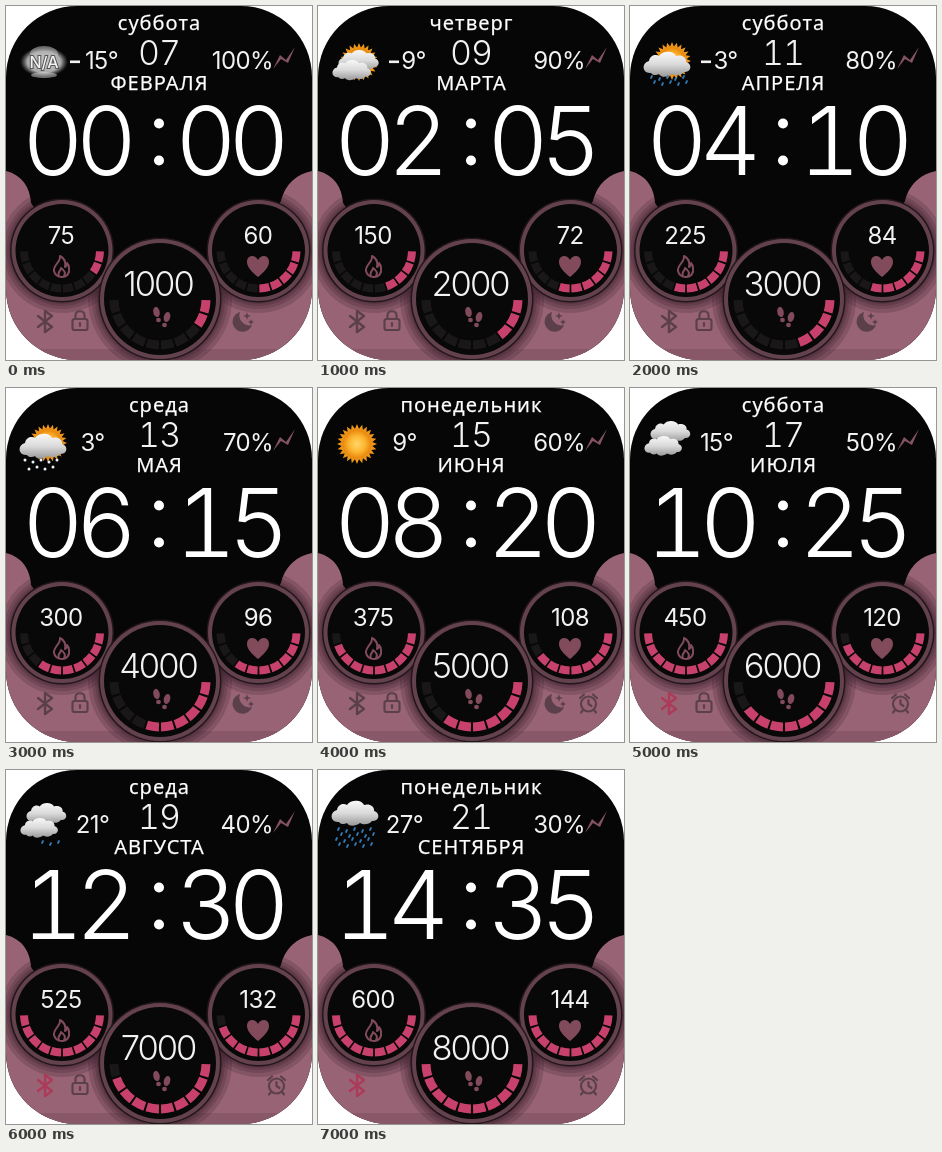
An HTML page that plays this animation: 306 px wide and 354 px high, repeating every 8000 ms.

```html
<!DOCTYPE html>
<html lang="ru">
<head>
<meta charset="utf-8">
<title>Watch face</title>
<style>
html, body { margin: 0; width: 100%; height: 100%; overflow: hidden; background: #fff; }
svg { display: block; width: 306px; height: 354px; }
text { fill: #f2f2f2; font-family: Inter, sans-serif; text-anchor: middle; }
.word { font: 20px "Noto Sans", sans-serif; letter-spacing: 1px; fill: #fff; stroke: #fff; stroke-width: .25; }
.time { font-size: 95.5px; font-weight: 300; fill: #fff; font-variant-numeric: tabular-nums; }
.date { font-size: 34px; font-weight: 300; font-variant-numeric: tabular-nums; letter-spacing: -1px; }
.big { font-size: 34.5px; font-weight: 300; letter-spacing: -2px; }
.mid { font-size: 24px; font-weight: 400; letter-spacing: -.6px; }
.line { fill: none; stroke-linecap: round; stroke-linejoin: round; }
</style>
</head>
<body>
<svg viewBox="0 0 306 354">
  <defs>
    <clipPath id="face"><rect width="306" height="354" rx="71"/></clipPath>
    <clipPath id="floor"><path d="M0 165C16 169 24 181 25 197L56 244L154 293L252 244L275 195C279 178 291 168 306 165V354H0Z"/></clipPath>
    <radialGradient id="sunFill">
      <stop offset="0" stop-color="#ffd768"/><stop offset=".55" stop-color="#fdb632"/><stop offset="1" stop-color="#e8860c"/>
    </radialGradient>
    <linearGradient id="cloudFill" x2="0" y2="1">
      <stop offset="0" stop-color="#f8f8f8"/><stop offset=".5" stop-color="#dadada"/><stop offset="1" stop-color="#999"/>
    </linearGradient>
    <radialGradient id="mist">
      <stop offset="0" stop-color="#d8d8d8"/><stop offset=".7" stop-color="#a9a9a9"/><stop offset="1" stop-color="#777" stop-opacity="0"/>
    </radialGradient>
    <path id="cloud" fill="url(#cloudFill)" d="M8 21C-1 22-2 11 6 9C7 3 13 2 16 4C20-2 31-1 33 4C39 2 44 6 43 10C50 12 48 21 41 20C38 24 32 24 29 22C24 26 17 25 16 22C13 24 9 23 8 21Z"/>
    <g id="sun">
      <path id="rays" fill="#ed941b"/>
      <circle r="14.5" fill="url(#sunFill)"/>
    </g>
  </defs>
  <g clip-path="url(#face)">
    <rect width="306" height="354" fill="#060606"/>
    <g clip-path="url(#floor)">
      <rect width="306" height="354" fill="#986475"/>
      <rect y="343" width="306" height="11" fill="#885868"/>
      <g id="halos" fill="#3a1f29" fill-opacity=".22"></g>
    </g>
    <g id="dials"></g>

    <path d="M267 63L274 49L280 54L289 41L282 57L275 53Z" fill="#855263"/>
    <circle cx="153" cy="117.500" r="5" fill="#fff"/><circle cx="153" cy="154.500" r="5" fill="#fff"/>

    <path class="line" stroke="#824b5b" stroke-width="2" d="M54 250C55 256 47 259 48 265C49 269 52 271 56 271C61 271 64 267 63 262C63 260 62 258 61 257C61 259 60 261 59 261C60 256 58 252 54 250ZM53 270C51 266 55 265 55 262C58 264 60 267 58 270"/>
    <path fill="#824b5b" d="M252 271C246 266 241 261 241 256C241 249 249 248 252 254C255 248 263 249 263 256C263 261 258 266 252 271Z"/>
    <g fill="#824b5b">
      <ellipse cx="150.500" cy="306" rx="3.200" ry="5.200" transform="rotate(-12 150.500 306)"/>
      <ellipse cx="152.500" cy="314" rx="2.400" ry="2.200"/>
      <ellipse cx="161" cy="311" rx="3.200" ry="5.200" transform="rotate(14 161 311)"/>
      <ellipse cx="158.500" cy="319" rx="2.400" ry="2.200"/>
    </g>

    <path id="radio" class="line" stroke-width="2.4" d="M32 310L46 321L39 326V305L46 310L32 321"/>
    <g id="lock" class="line" stroke="#5b404b" stroke-width="2.2">
      <rect x="66.500" y="313" width="15" height="11" rx="2"/><path d="M69.500 313V309C69.500 304 78.500 304 78.500 309V313M74 317V320"/>
    </g>
    <g id="moon" fill="#5b404b">
      <path d="M234 306A10 10 0 1 0 246 319A10 10 0 0 1 234 306Z"/>
      <path d="M241 306L242 309L245 310L242 311L241 314L240 311L237 310L240 309ZM245 313L246 315L248 316L246 317L245 319L244 317L242 316L244 315Z"/>
    </g>
    <g id="alarm" class="line" stroke="#5b404b" stroke-width="2.2">
      <circle cx="270.500" cy="316" r="7.500"/><path d="M270.500 312V316L273.500 318M262 310L266 306.500M279 310L275 306.500M265 322L263 324.500M276 322L278 324.500"/>
    </g>

    <g id="weather"></g>
    <g id="labels"></g>
  </g>
</svg>
<script>
const el = id => document.getElementById(id);
const rad = a => a * Math.PI / 180;
const polar = (x, y, r, a) => `${(x + r * Math.cos(rad(a))).toFixed(2)} ${(y + r * Math.sin(rad(a))).toFixed(2)}`;

const dials = [
  { x: 56, y: 244.5, r: 50.5, arc: 42, band: 8, fill: [2, 4, 6, 7, 9, 10, 10, 10] },
  { x: 252.5, y: 244.5, r: 50.5, arc: 42, band: 8, fill: [5, 6, 6, 7, 8, 9, 9, 10] },
  { x: 154, y: 293, r: 60, arc: 50.5, band: 9, fill: [2, 3, 4, 6, 7, 8, 9, 10] }
];
const days = ["суббота", "четверг", "суббота", "среда", "понедельник", "суббота", "среда", "понедельник"];
const months = ["ФЕВРАЛЯ", "МАРТА", "АПРЕЛЯ", "МАЯ", "ИЮНЯ", "ИЮЛЯ", "АВГУСТА", "СЕНТЯБРЯ"];

function segment(d, i) {
  const a = i * 18 + 1.3, b = i * 18 + 16.7, q = d.arc - d.band;
  return `<path d="M${polar(d.x, d.y, d.arc, a)}A${d.arc} ${d.arc} 0 0 1 ${polar(d.x, d.y, d.arc, b)}` +
    `L${polar(d.x, d.y, q, b)}A${q} ${q} 0 0 0 ${polar(d.x, d.y, q, a)}Z"/>`;
}

for (const d of dials) {
  const ring = (r, fill) => `<circle cx="${d.x}" cy="${d.y}" r="${r}" fill="${fill}"/>`;
  el("halos").innerHTML += [3, 5, 8, 12].map(w => `<circle cx="${d.x}" cy="${d.y}" r="${d.r + w}"/>`).join("");
  el("dials").innerHTML += ring(d.r + 1.5, "#22161a") + ring(d.r, "#63424e") +
    ring(d.r - 4, "#080808") +
    "<g>" + Array.from({ length: 10 }, (_, i) => segment(d, i)).join("") + "</g>";
}
const bars = [...el("dials").querySelectorAll("g")].map(g => [...g.children]);

el("rays").setAttribute("d", "M" + Array.from({ length: 48 }, (_, i) => polar(0, 0, i % 2 ? 15.5 : 20, i * 7.5)).join("L") + "Z");

const use = (id, x, y, s = 1) => `<use href="#${id}" transform="translate(${x} ${y}) scale(${s})"/>`;

function rain(x, y, cols, rows) {
  let d = "";
  for (let r = 0; r < rows; r++)
    for (let c = 0; c < cols; c++)
      d += `M${x + c * 8 + r % 2 * 4 - r} ${y + r * 5 + c % 2 * 2}l-1 2`;
  return `<path class="line" stroke="#2f7ab8" stroke-width="1.8" d="${d}"/>`;
}

function snow(x, y) {
  let s = "";
  for (let i = 0; i < 9; i++)
    s += `<circle cx="${x + i % 5 * 8 + (i > 4 ? 4 : 0)}" cy="${y + (i > 4 ? 7 : 0) + i % 2 * 2}" r="1.500"/>`;
  return `<g fill="#e8f3fb">${s}</g>`;
}

const clouds = use("cloud", 20, 33, .85) + use("cloud", 14, 48, .8);
const shower = use("sun", 42, 55, .95) + use("cloud", 13, 46);
const weather = [
  `<ellipse cx="38" cy="56" rx="24" ry="15" fill="url(#mist)"/>
   <ellipse cx="38" cy="48" rx="14" ry="8" fill="#bbb" opacity=".55"/>
   <ellipse cx="38" cy="69" rx="13" ry="3" fill="#ddd" opacity=".5"/>
   <text x="38" y="62" font-size="16" font-weight="500" stroke="#555" stroke-width="2" paint-order="stroke">N/A</text>`,
  use("sun", 41, 56, .95) + use("cloud", 20, 44, .86) + use("cloud", 14, 54, .82),
  shower + rain(22, 70, 5, 2),
  shower + snow(19, 72),
  use("sun", 39, 56),
  clouds,
  clouds + rain(37, 71, 3, 1),
  use("cloud", 13, 31) + rain(21, 58, 5, 4)
];

const label = (cls, x, y, s, extra = "") => `<text class="${cls}" x="${x}" y="${y}" ${extra}>${s}</text>`;
const pad = n => String(n).padStart(2, "0");

function labels(k) {
  const temp = -15 + 6 * k, cold = temp < 0;
  const clock = pad(2 * k) + pad(5 * k);
  return label("word", 153.5, 24, days[k]) +
    label("date", 153, 59, pad(7 + 2 * k)) +
    label("word", 153.5, 84, months[k]) +
    label("mid", cold ? 95.5 : 86.5, 63, Math.abs(temp) + "°") +
    (cold ? `<rect x="${temp < -9 ? 64 : 71}" y="54.500" width="10" height="2.600" fill="#f2f2f2"/>` : "") +
    label("mid", 267, 63, 100 - 10 * k + "%", 'style="text-anchor:end"') +
    [47, 100.5, 200, 253].map((x, i) => label("time", x, 168.5, clock[i])).join("") +
    label("mid", 55, 238, 75 * (k + 1)) +
    label("mid", 252, 238, 60 + 12 * k) +
    label("big", 152, 289.5, 1000 * (k + 1));
}

const show = (id, on) => { el(id).style.display = on ? "" : "none"; };

function draw(k) {
  el("labels").innerHTML = labels(k);
  el("weather").innerHTML = weather[k];
  bars.forEach((set, i) => set.forEach((bar, j) =>
    bar.setAttribute("fill", j < dials[i].fill[k] ? "#c8416c" : "#191718")));
  el("radio").setAttribute("stroke", k < 5 ? "#5b404b" : "#ac3a59");
  show("lock", k < 7);
  show("moon", k < 5);
  show("alarm", k > 3);
}

let last = -1;
const start = performance.now();
function tick() {
  const k = Math.floor((performance.now() - start) / 1000) % 8;
  if (k !== last) draw(last = k);
  requestAnimationFrame(tick);
}
tick();
</script>
</body>
</html>
```
